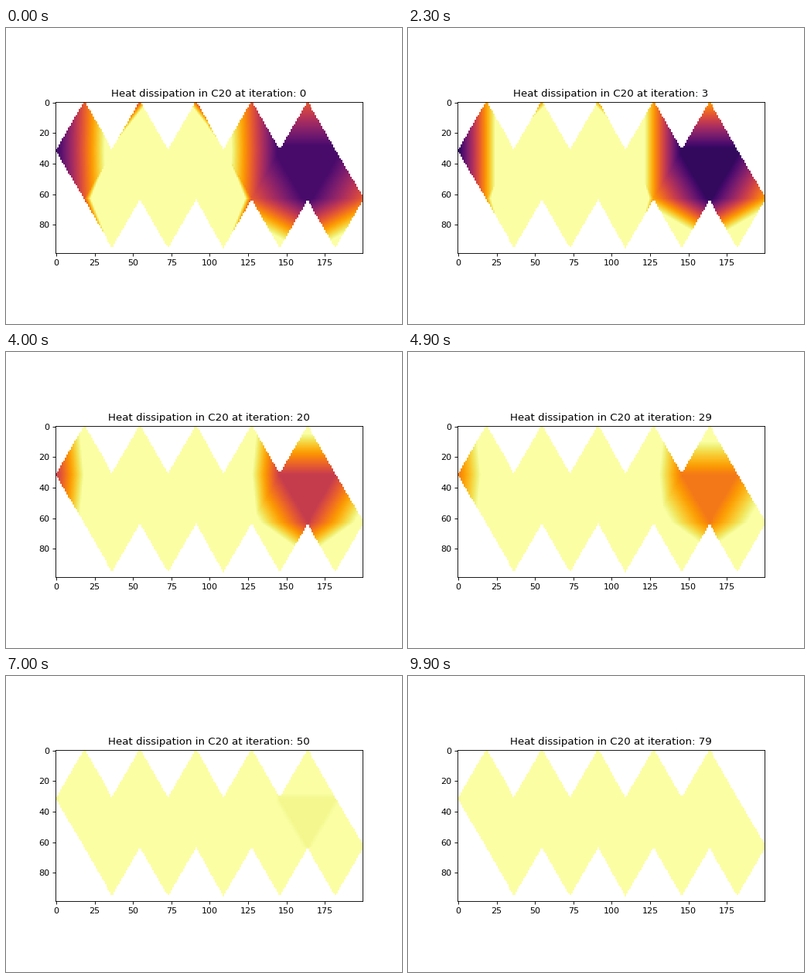
A matplotlib script for the animation above (10000 ms loop, 512x384 px).

```python
import numpy as np
import matplotlib.pyplot as plt
from matplotlib.animation import FuncAnimation

COLS, ROWS = 200, 99
SIDE = COLS / 5.5
HEIGHT = SIDE * np.sqrt(3) / 2
HOLD, STEPS = 20, 80

# Vertices of the unfolded icosahedron fall into four rings around the hot face.
HOT, NEAR, FAR, COLD = range(4)
TOP = [FAR] * 5
UPPER = [COLD, NEAR, HOT, NEAR, COLD, COLD]
LOWER = [FAR, HOT, HOT, FAR, COLD, FAR]
BOTTOM = [NEAR] * 5


def vertex(row, i):
    ring = (TOP, UPPER, LOWER, BOTTOM)[row][i]
    shift = (0.5, 0, 0.5, 1)[row]
    return (i + shift) * SIDE, row * HEIGHT, ring


def net_triangles():
    for i in range(5):
        a, b = vertex(1, i), vertex(1, i + 1)
        c, d = vertex(2, i), vertex(2, i + 1)
        yield vertex(0, i), a, b
        yield a, b, c
        yield b, c, d
        yield c, d, vertex(3, i)


def ring_weights(tol=0.012):
    """Barycentric weight of each ring at every cell; NaN outside the net."""
    y, x = np.mgrid[:ROWS, :COLS]
    weights = np.full((ROWS, COLS, 4), np.nan)
    for (x0, y0, r0), (x1, y1, r1), (x2, y2, r2) in net_triangles():
        det = (y1 - y2) * (x0 - x2) + (x2 - x1) * (y0 - y2)
        u = ((y1 - y2) * (x - x2) + (x2 - x1) * (y - y2)) / det
        v = ((y2 - y0) * (x - x2) + (x0 - x2) * (y - y2)) / det
        w = 1 - u - v
        inside = (np.minimum(np.minimum(u, v), w) >= -tol)
        inside &= np.isnan(weights[..., 0])
        weights[inside] = 0
        for part, ring in ((u, r0), (v, r1), (w, r2)):
            weights[inside, ring] += part[inside]
    return weights


def ring_heat(t):
    slow = 1.375 * np.exp(-0.031 * t)
    fast = np.exp(-0.2 * t)
    return np.array([
        1.265 + slow + 1.2 * np.exp(-0.1 * t),
        1.265 + 0.3 * slow - 0.36 * fast,
        1.265 - 0.236 * slow - 0.33 * fast,
        1.265 - slow + 0.217 * fast,
    ])


WEIGHTS = ring_weights()
START = np.array([3.9, 1.13, 0.63, 0.17])


def heat_map(frame):
    if frame < HOLD:
        return np.maximum(WEIGHTS @ START, 0.215)
    return np.maximum(WEIGHTS @ ring_heat(frame - HOLD), 0.165)


fig, ax = plt.subplots(figsize=(6.4, 4.8), dpi=80)
image = ax.imshow(heat_map(0), cmap="inferno", vmin=0, vmax=1,
                  interpolation="nearest")
title = ax.set_title("")


def update(frame):
    image.set_data(heat_map(frame))
    title.set_text(f"Heat dissipation in C20 at iteration: {max(0, frame - HOLD)}")
    return image, title


anim = FuncAnimation(fig, update, frames=HOLD + STEPS, interval=100,
                     repeat=True, repeat_delay=0, blit=False)
plt.show()
```
